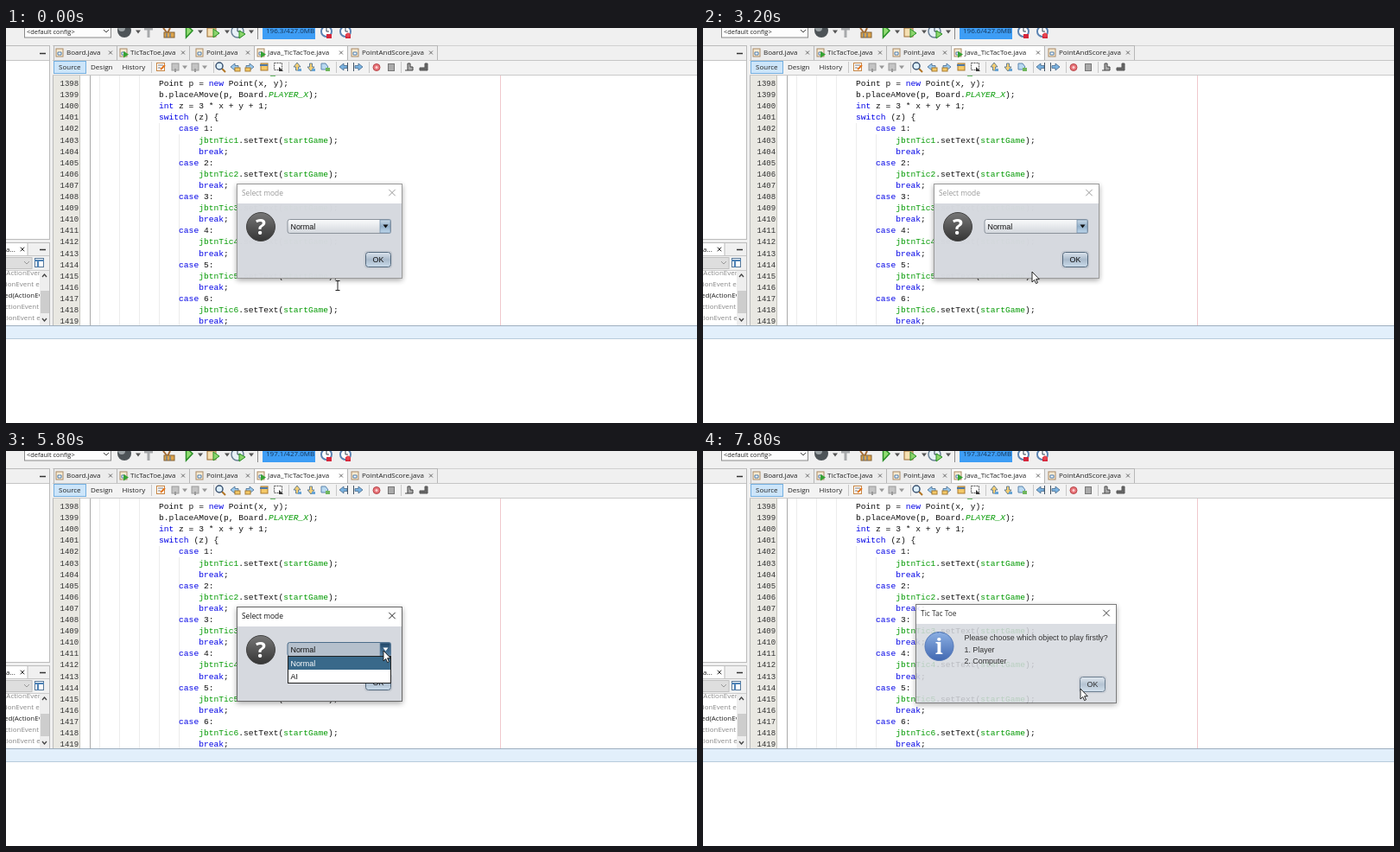
Write an HTML page that moves like this. It is 800 px wide and 457 px high and loops after 8 s.

```html
<!DOCTYPE html>
<html lang="en">
<head>
<meta charset="utf-8">
<title>Select mode</title>
<style>
html, body { margin: 0; height: 100%; overflow: hidden; background: #fff; }
svg { display: block; width: 100vw; height: 100vh; }
text { font-family: "Open Sans", sans-serif; font-size: 8px; }
.code { font-family: "Liberation Mono", monospace; font-size: 9.62px; }
.swing { font-family: "Liberation Sans", sans-serif; font-size: 8.9px; }
.key { fill: #0000e6; }
.field { fill: #090; }
.static { fill: #090; font-style: italic; }
</style>
</head>
<body>
<svg viewBox="0 0 800 457">
  <defs>
    <linearGradient id="field" x2="0" y2="1"><stop stop-color="#fafbfc"/><stop offset="1" stop-color="#d2d6dc"/></linearGradient>
    <linearGradient id="blue" x2="0" y2="1"><stop stop-color="#c9d9e7"/><stop offset=".5" stop-color="#93b0ca"/><stop offset="1" stop-color="#bed7ec"/></linearGradient>
    <linearGradient id="button" x2="0" y2="1"><stop stop-color="#dce4ed"/><stop offset=".5" stop-color="#a9bacb"/><stop offset="1" stop-color="#cbdceb"/></linearGradient>
    <linearGradient id="pressed" x2="0" y2="1"><stop stop-color="#204666"/><stop offset="1" stop-color="#5783a6"/></linearGradient>
    <linearGradient id="question" x2="0" y2="1"><stop stop-color="#777"/><stop offset="1" stop-color="#353535"/></linearGradient>
    <linearGradient id="info" x2="0" y2="1"><stop stop-color="#7aa3df"/><stop offset="1" stop-color="#2350a5"/></linearGradient>
    <filter id="shadow" x="-10%" y="-15%" width="120%" height="135%"><feDropShadow dx="0" dy="2" stdDeviation="3" flood-opacity=".35"/></filter>
  </defs>
  <g id="ide"></g>
  <g id="live"></g>
</svg>
<script>
const LOOP = 8000, STEP = 200;
const rect = (x, y, w, h, fill, stroke = "none", more = "") =>
  `<rect x="${x}" y="${y}" width="${w}" height="${h}" fill="${fill}" stroke="${stroke}" ${more}/>`;
const path = (d, stroke, width = 1, fill = "none") =>
  `<path d="${d}" fill="${fill}" stroke="${stroke}" stroke-width="${width}"/>`;
const circle = (x, y, r, fill, stroke = "none", more = "") =>
  `<circle cx="${x}" cy="${y}" r="${r}" fill="${fill}" stroke="${stroke}" ${more}/>`;
const text = (x, y, s, fill = "#222", more = "") => `<text x="${x}" y="${y}" fill="${fill}" ${more}>${s}</text>`;
const swing = (x, y, s, fill = "#111", more = "") => text(x, y, s, fill, `class="swing" ${more}`);
const vline = (x, y1, y2, color) => path(`M${x + .5} ${y1}V${y2}`, color);
const hline = (y, x1, x2, color) => path(`M${x1} ${y + .5}H${x2}`, color);
const caret = (x, y, color = "#555") => path(`M${x - 3} ${y - 1.5}h6l-3 4z`, "none", 0, color);
const cross = (x, y, r, color) => path(`M${x - r} ${y - r}l${2 * r} ${2 * r}m0 ${-2 * r}l${-2 * r} ${2 * r}`, color);

function topToolbar() {
  const clock = (x, color) => circle(x, 4, 6, "#fff", color, 'stroke-width="2"') + path(`M${x} 0v4h3`, "#345") + rect(x, 7, 6, 5, "#d6283c");
  return rect(0, 0, 800, 20, "#f0f0f0")
    + rect(21.5, -5, 100, 16, "#fdfdfd", "#8a8a8a") + text(24, 6.5, "&lt;default config&gt;", "#222", 'style="font-size:7.4px"')
    + path("M113 2l3 3l3-3", "#444")
    + circle(137, 3, 8, "#4d5357") + circle(134, 0, 4, "#9ba2a5") + caret(153, 4)
    + path("M160 1h10M165 1v10", "#a7a9ab", 3)
    + path("M182 0l4 5M190 0l-4 8", "#a66e38", 2) + rect(183, 5, 12, 6, "#dda348", "#826034") + path("M186 6v5M190 6v5", "#3b6fb5")
    + path("M208.500-4L216 3L208.500 11z", "#298f27", 1.5, "#91dc72") + caret(225, 4)
    + rect(233, 0, 10, 10, "#f5dfb2", "#9a6b31") + path("M240 1l7 5l-7 5z", "#298f27", 1, "#8bd46b") + caret(256, 4)
    + circle(268, 4, 7, "#e7f0f7", "#6b8196", 'stroke-width="1.5"') + path("M268 0v4h4", "#345") + path("M270 3l7 4l-7 5z", "#298f27", 1, "#8bd46b") + caret(284, 4)
    + path("M291.500 0V13", "#888") + clock(371, "#5b83b2") + clock(393, "#5b83b2") + circle(396, 8, 2.5, "#e54852");
}

function tabs() {
  const list = [["Board.java", 55, 70, 128], ["TicTacToe.java", 128, 144, 212], ["Point.java", 212, 232, 287],
    ["Java_TicTacToe.java", 287, 303, 395], ["PointAndScore.java", 395, 412, 499]];
  return rect(54, 20, 746, 17, "#f0f0f0") + hline(20, 54, 800, "#d0d0d0") + list.map(([name, x, tx, end], i) =>
    rect(x + .5, 20.5, end - x, 17, i == 3 ? "#fff" : "#ececec", "#b7b7b7")
    + rect(tx - 12, 24, 8, 9, "#f8ead1", "#a98a66") + path(`M${tx - 10} 28h4v3h-4z`, "#4878a8", 1, "#fff")
    + (i == 1 || i == 3 ? path(`M${tx - 8} 27l6 3.500l-6 4z`, "none", 0, "#35a332") : "")
    + text(tx, 31, name) + cross(end - 7, 28.5, 2, "#666")).join("");
}

function editorToolbar() {
  const arrow = (x, dir, color) => path(`M${x + dir * 5} 45l${-dir * 5}-4v2.500h${-dir * 4}v3h${dir * 4}v2.500z`, "#476a8c", .8, color);
  const page = (x, fill, stroke) => rect(x - 4, 41, 8, 8, fill, stroke);
  let s = rect(54, 37, 746, 18, "#f3f3f3") + hline(37, 54, 800, "#c5c5c5") + hline(54, 54, 800, "#c9c9c9")
    + rect(55.5, 38.5, 37, 14, "#cce5fa", "#74afe0") + text(61, 48, "Source") + text(98, 48, "Design") + text(134.5, 48, "History");
  s += rect(174.5, 40.5, 9, 9, "#fff", "#c78746") + path("M176 43h6M176 46h3", "#777") + path("M179 48l5-5", "#e2741d", 2);
  for (const x of [196, 219]) s += page(x, "#c4c4c4", "#999") + path(`M${x} 47v4`, "#999", 2) + caret(x + 11, 45, "#999");
  for (const x of [168, 240, 327, 382, 420, 457]) s += vline(x, 39, 52, "#c8c8c8");
  s += path("M249 46l5 5", "#b27524", 2) + circle(247, 44, 4, "#dceefc", "#3c5370", 'stroke-width="1.5"');
  s += arrow(265, -1, "#99c9ef") + rect(265, 46, 6, 4, "#f4c968", "#a77d34") + arrow(282, 1, "#99c9ef") + rect(277, 46, 6, 4, "#f4c968", "#a77d34");
  s += page(299, "#f4c968", "#a9792c") + path("M294 43h9", "#4e79a8", 2) + rect(310.5, 40.5, 9, 8, "#fff", "#555", 'stroke-dasharray="2 1"') + path("M316 45l5 5h-5z", "none", 0, "#333");
  s += [337, 353].map((x, i) => `<g transform="rotate(${i ? 90 : -90} ${x} 45)">${arrow(x, 1, "#f5cf72")}</g>` + rect(x + 1, 47, 4, 3, "#67a4d5")).join("");
  s += path("M365 41h5l3 4l-3 3h-5z", "#5c85ad", 1, "#b9d9f0") + rect(370, 46, 5, 4, "#70b65e");
  s += arrow(391, -1, "#79b2e1") + vline(395, 40, 50, "#456") + arrow(408, 1, "#79b2e1") + vline(402, 40, 50, "#456");
  s += circle(429, 45.5, 4, "#e8747a", "#b74649") + circle(429, 45.5, 1.5, "#fbd0d0") + rect(442.5, 41.5, 7, 8, "#aaa", "#777");
  return s + path("M462 49h9v-4h-3v-4h-3v8", "#444", 1, "#aaa") + path("M479 49h9v-8h-3v5h-6z", "#555", 1, "#666");
}

function leftPanels() {
  const rows = ["(ActionEvent", "nActionEvent e", "ed(ActionEv", "ctionEvent", "ctionEvent e"];
  return rect(0, 20, 54, 437, "#f0f0f0") + rect(-1, 20.5, 51.5, 224, "#fff", "#bbb") + rect(0, 21, 50, 16, "#f0f0f0")
    + hline(37, 0, 50, "#c5c5c5") + path("M39 29.500h7", "#333", 1.5)
    + rect(-1, 248.5, 51.5, 96, "#fff", "#bbb") + rect(0, 249, 50, 31, "#f0f0f0") + rect(-1, 248.5, 26, 15, "#fff", "#bbb")
    + text(0, 259, "a...") + cross(19, 256, 2.3, "#333") + path("M39 256.500h7", "#333", 1.5) + hline(263, 0, 50, "#c5c5c5")
    + rect(-1, 265.5, 31, 13, "#dedede", "#c0c0c0") + path("M21 270l3 3l3-3", "#999")
    + rect(33.5, 266.5, 10, 10, "#fff", "#557799") + path("M33 269h11M37 269v8", "#4f83b6", 2) + hline(280, 0, 50, "#ccc")
    + '<svg y="281" width="39" height="63">' + rows.map((s, i) => text([-2, -17, -2, -1, -6][i], 5 + i * 13.1, s, i == 2 ? "#222" : "#888")).join("") + "</svg>"
    + rect(39, 281, 11, 63, "#eee") + rect(40, 304, 10, 26, "#cdcdcd") + path("M42 288l2.500-3l2.500 3M42 336l2.500 3l2.500-3", "#444", 1.3);
}

function editor() {
  const lines = [[0, "Point p = new Point(x, y);"], [0, "b.placeAMove(p, Board.PLAYER_X);"], [0, "int z = 3 * x + y + 1;"], [0, "switch (z) {"]];
  for (let n = 1; n <= 6; n++) lines.push([4, `case ${n}:`], [8, `jbtnTic${n}.setText(startGame);`], [8, "break;"]);
  const mark = s => s.replace(/\b(new|int|switch|case|break)\b|(jbtnTic\d|startGame)|(PLAYER_X)/g,
    (m, key, field) => `<tspan class="${key ? "key" : field ? "field" : "static"}">${m}</tspan>`);
  let s = rect(54, 55, 746, 290, "#fff") + rect(55, 55, 31, 290, "#e9e8e2") + vline(54, 20, 345, "#bbb") + vline(85, 55, 345, "#c4c3bd") + vline(97, 55, 345, "#aaa");
  for (const [x, y] of [[108, 55], [131, 55], [154, 55], [177, 110], [200, 123]]) s += vline(x, y, 344, "#ececec");
  s += vline(572, 55, 344, "#f0c8cc") + hline(55, 306, 312, "#63b763");
  lines.forEach(([indent, code], i) => {
    const y = 67 + i * 13.1;
    s += text(62.5, y, 1398 + i, "#333", 'class="code" style="font-size:9px"') + text(177 + indent * 5.77, y, mark(code), "#111", 'class="code"');
  });
  return s + rect(0, 344, 800, 16, "#e2effb") + hline(344, 0, 800, "#9eafbf") + hline(359, 0, 800, "#b8cbdc") + rect(0, 360, 800, 97, "#fff");
}

function windowFrame(x, y, w, h, title, active, closable) {
  return `<g filter="url(#shadow)" opacity="${active ? 1 : .98}">` + rect(x + .5, y + .5, w - 1, h - 1, "#d6d9df", active ? "#686868" : "#999") + "</g>"
    + rect(x + 1, y + 1, w - 2, 22, "#fff") + text(x + 6, y + 14, title, active ? "#111" : "#999", 'style="font-size:8.4px"')
    + (closable ? cross(x + w - 12, y + 10.5, 3.7, active ? "#222" : "#999") : "");
}
const okButton = (x, y, down) =>
  rect(x - 1, y - 1, 32, 20, "none", down ? "#7ba1c1" : "#c3c8d0", 'rx="4"')
  + rect(x + .5, y + .5, 29, 17, down ? "url(#pressed)" : "url(#button)", "#52677b", 'rx="3"')
  + swing(x + 15, y + 12.3, "OK", down ? "#fff" : "#111", 'text-anchor="middle"');
const badge = (x, y, sign, fill) => circle(x, y, 16.5, `url(#${fill})`, fill == "info" ? "#3762ad" : "#444")
  + text(x, y + 9, sign, "#fff", `text-anchor="middle" style="font:bold 25px ${fill == "info" ? "'Noto Serif',serif" : "'Open Sans',sans-serif"}"`);

function selectDialog(t) {
  const active = t >= 5600, open = active && t < 6600, overAI = t >= 6200;
  let s = windowFrame(267, 180, 192, 110, "Select mode", active, t < 7400) + badge(295, 230, "?", "question") + okButton(416, 259, t >= 7400)
    + rect(326, 221.5, 119.5, 16, open ? "#b5c0cc" : "url(#field)", open ? "#4c6d8a" : "#8b929b", 'rx="2.5"')
    + rect(433, 222, 12, 15, open ? "url(#pressed)" : "url(#blue)", "#6d8ba7", 'stroke-width=".7"') + caret(439.5, 229, open ? "#fff" : "#111")
    + swing(329.5, 233, t < 6600 ? "Normal" : "AI");
  if (open) s += rect(326.5, 237.5, 119, 31, "#fff", "#222") + rect(327, overAI ? 253 : 238, 118, 15, "#39698a")
    + swing(329.5, 249, "Normal", overAI ? "#111" : "#fff") + swing(329.5, 264, "AI", overAI ? "#fff" : "#111");
  return s;
}
const choiceDialog = () => '<g opacity=".86">' + windowFrame(246, 177, 233, 115, "Tic Tac Toe", true, true) + badge(273.5, 226, "i", "info")
  + ["Please choose which object to play firstly?", "1. Player", "2. Computer"].map((s, i) => swing(302.5, 219 + i * 13.7, s)).join("")
  + okButton(436, 261, false) + "</g>";

const route = [[0, 384, 298], [600, 384, 298], [800, 384, 297], [3000, 384, 297], [3200, 381, 282], [4200, 419, 266], [4400, 419, 266],
  [5200, 437, 231], [5800, 437, 231], [6200, 425, 257], [6600, 425, 257], [7200, 434, 271], [7400, 434, 271], [7600, 437, 275], [8000, 437, 275]];
function pointer(t) {
  const i = route.findIndex(p => p[0] > t), [t0, x0, y0] = route[i - 1], [t1, x1, y1] = route[i];
  const k = (t - t0) / (t1 - t0), x = x0 + (x1 - x0) * k, y = y0 + (y1 - y0) * k;
  if (t < 3200 || t == 7400) {
    const h = t < 3200 ? 5.5 : 3.5;
    return path(`M${x - 2.5} ${y - h}h5M${x} ${y - h}v${2 * h}M${x - 2.5} ${y + h}h5`, t < 3200 ? "#222" : "#d9bd84");
  }
  return path(`M${x} ${y}v12l2.700-2.600l1.900 4.200l1.900-.9l-1.900-4h3.700z`, "#111", .9, "#fff");
}

function memoryBar(t) {
  const used = [[6600, 197.3], [5400, 197.1], [4400, 196.9], [3600, 196.8], [2400, 196.6], [1200, 196.4], [0, 196.3]].find(([from]) => t >= from)[1];
  return rect(297, 0, 61, 13, "#3d9df5") + text(301, 5.5, `${used.toFixed(1)}/427.0MB`, "#163455");
}

document.getElementById("ide").innerHTML = topToolbar() + leftPanels() + editor() + tabs() + editorToolbar();
const live = document.getElementById("live");
let shown = -1;
function draw(now) {
  const t = Math.floor(now % LOOP / STEP) * STEP;
  if (t != shown) {
    shown = t;
    live.innerHTML = memoryBar(t) + (t < 7600 ? selectDialog(t) : t >= 7800 ? choiceDialog() : "") + pointer(t);
  }
}
const start = performance.now();
function tick() {
  draw(performance.now() - start);
  requestAnimationFrame(tick);
}
tick();
</script>
</body>
</html>
```
